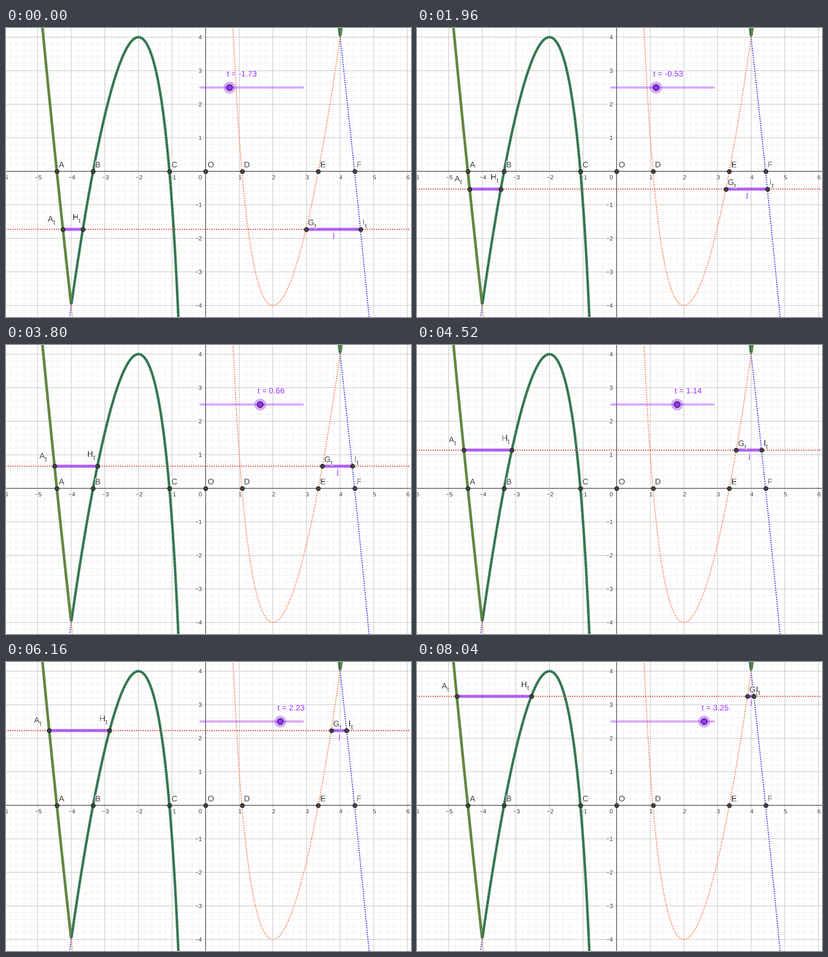
A matplotlib script for the animation above (8280 ms loop, 885 px wide and 633 px high).

```python
import numpy as np
import matplotlib.pyplot as plt
from matplotlib.animation import FuncAnimation
from matplotlib.collections import LineCollection
from matplotlib.patheffects import withStroke

plt.rcParams["font.family"] = "Liberation Sans"
plt.rcParams["lines.scale_dashes"] = False

W, H, DPI = 885, 633, 72          # at 72 dpi one point is one pixel
OX, OY, UNIT = 436.3, 313.9, 73.45
STEP, LOOP = 40, 8280
PURPLE, INK, AXIS = "#9933ff", "#404040", "#404040"
BLUE, ORANGE, RED = "#3c3cf5", "#fa8558", "#dc4646"
NAVY, BROWN, GREEN = "#1834a0", "#b5652c", "#4a9148"

fig = plt.figure(figsize=(W / DPI, H / DPI), dpi=DPI, facecolor="white")
ax = fig.add_axes([0, 0, 1, 1])
ax.set_xlim(0, W)
ax.set_ylim(H, 0)
ax.axis("off")


def px(x):
    return OX + UNIT * x


def py(y):
    return OY - UNIT * y


def f(x):
    return 16 - x**2 + 16 / x


def g(x):
    return x**2 - 16 + 16 / x


def roots(sign, t):
    """Sorted solutions of g(x) = t for sign 1, of f(x) = t for sign -1."""
    return np.sort(np.roots([1, 0, -16 - sign * t, 16 * sign]).real)


def line(xs, ys, color, lw, z, **kw):
    return ax.plot(xs, ys, color=color, lw=lw, zorder=z, snap=False, **kw)[0]


def dots(xs, ys, color, z=4):
    return line(xs, ys, color, 2.8, z, dashes=(0.1, 4.9), dash_capstyle="round")


def curve(fn, a, b, color):
    x = np.linspace(a, b, 300)
    dots(px(x), py(fn(x)), color)


def label(x, y, s, color=INK, size=17.7, z=9, **kw):
    halo = [withStroke(linewidth=3, foreground="white")]
    return ax.text(x, y, s, color=color, fontsize=size, zorder=z,
                   path_effects=halo, **kw)


def tick(x, y, v, ha):
    label(x, y, str(v).replace("-", "\u2212"), "#333333", 13, 2.5,
          ha=ha, va="center_baseline")


def disc(xs, y, size, face, edge="none", z=8, **kw):
    return ax.plot(xs, [y] * len(xs), "o", ms=size, mfc=face, mec=edge,
                   zorder=z, snap=False, **kw)[0]


def grid(step, color, z):
    n = np.arange(round(-6 / step) - 1, round(6 / step) + 2) * step
    segs = [[(px(v), 0), (px(v), H)] for v in n]
    segs += [[(0, py(v)), (W, py(v))] for v in n]
    ax.add_collection(LineCollection(segs, colors=color, linewidths=1.1,
                                     zorder=z, snap=False))


# Grid, axes and tick labels
grid(0.2, "#f0f0f0", 0)
grid(1, "#c4c4c4", 1)
line([0, W], [OY, OY], AXIS, 1.4, 2)
line([OX, OX], [0, H], AXIS, 1.4, 2)
for v in range(-6, 7):
    if v:
        tick(px(v) + 1.5, 327, v, "center")
        if abs(v) < 5:
            tick(428, py(v), v, "right")
tick(428, 327, 0, "right")

# Upper envelope; its samples straddle the corner, which blunts the tip
for corner in (-4, 4):
    x = corner + 0.014 * (np.arange(-70, 240) + 0.5)
    line(px(x), py(np.maximum(f(x), g(x))), GREEN, 5.8, 3,
         solid_joinstyle="bevel", solid_capstyle="butt")

# Dotted functions, darker where they lie on the envelope
curve(f, -4.1, -4, BLUE)
curve(f, -4, -0.7, NAVY)
curve(f, 3.9, 4, NAVY)
curve(f, 4, 5, BLUE)
curve(g, -5, -4, BROWN)
curve(g, -4, -3.9, ORANGE)
curve(g, 0.75, 4, ORANGE)
curve(g, 4, 4.1, BROWN)

# Fixed points on the x axis
zeros = np.sort(np.concatenate([roots(1, 0), roots(-1, 0), [0]]))
disc(px(zeros), OY, 9, "#444444", "#151515", mew=1.2)
for name, x in zip("ABCODEF", zeros):
    label(px(x) + 4.5, OY - 8.7, name)

# Moving level line, chords, end points and their labels
level = dots([0, W], [0, 0], RED, 5)
chords = [line([], [], PURPLE, 6.8, 6, alpha=0.7, solid_capstyle="butt")
          for _ in range(2)]
ends = disc([0] * 4, 0, 9, "#444444", "#151515", mew=1.2)
# letter, offset from its point, distance to the subscript
TAGS = [("A", -33, -17, 12), ("H", -22, -20.5, 13),
        ("G", 4.2, -9, 14), ("I", 4.5, -9.5, 5.2)]
tags = [(label(0, 0, tag[0], z=9.1), label(0, 0, "t", size=14.5)) for tag in TAGS]
j_tag = label(0, 0, "j", PURPLE, ha="center")

# Slider
SY = 130.3
line([425, 648.5], [SY, SY], PURPLE, 5, 7, alpha=0.4, solid_capstyle="round")
glow = disc([0], SY, 26, PURPLE, z=7.1, alpha=0.4)
knob = disc([0], SY, 12.5, PURPLE, "#1c1030", 7.2, mew=1.4)
value = label(0, 106, "", PURPLE)

# The slider is redrawn about every 124 ms, on the 40 ms clock
BEATS = STEP * np.maximum(0, np.floor(3.1 * np.arange(66) - 0.5))
KEY_MS = [0, 840, 1960, 3800, 5160, 7040, 8040]
KEY_T = [-1.73, -1.19, -0.53, 0.66, 1.68, 2.72, 3.25]


def update(k):
    now = BEATS[BEATS <= k * STEP][-1]
    t = round(float(np.interp(now, KEY_MS, KEY_T)), 2) + 0.0
    y = py(t)
    rg, rf = roots(1, t), roots(-1, t)
    xs = px(np.array([rg[0], rf[0], rg[2], rf[2]]))

    level.set_ydata([y, y])
    ends.set_data(xs, [y] * 4)
    for chord, pair in zip(chords, (xs[:2], xs[2:])):
        chord.set_data(pair, [y, y])
    for (big, sub), x, (_, dx, dy, gap) in zip(tags, xs, TAGS):
        big.set_position((x + dx, y + dy))
        sub.set_position((x + dx + gap, y + dy + 6.5))
    j_tag.set_position((xs[2:].mean() + 1.3, y + 17.5))

    kx = 536.5 + 27.9 * t
    glow.set_xdata([kx])
    knob.set_xdata([kx])
    value.set_x(kx - 5.5)
    value.set_text(f"t = {t:.2f}")
    return []


anim = FuncAnimation(fig, update, frames=LOOP // STEP, interval=STEP,
                     init_func=lambda: update(0), repeat=True, repeat_delay=0,
                     cache_frame_data=False)
plt.show()
```
